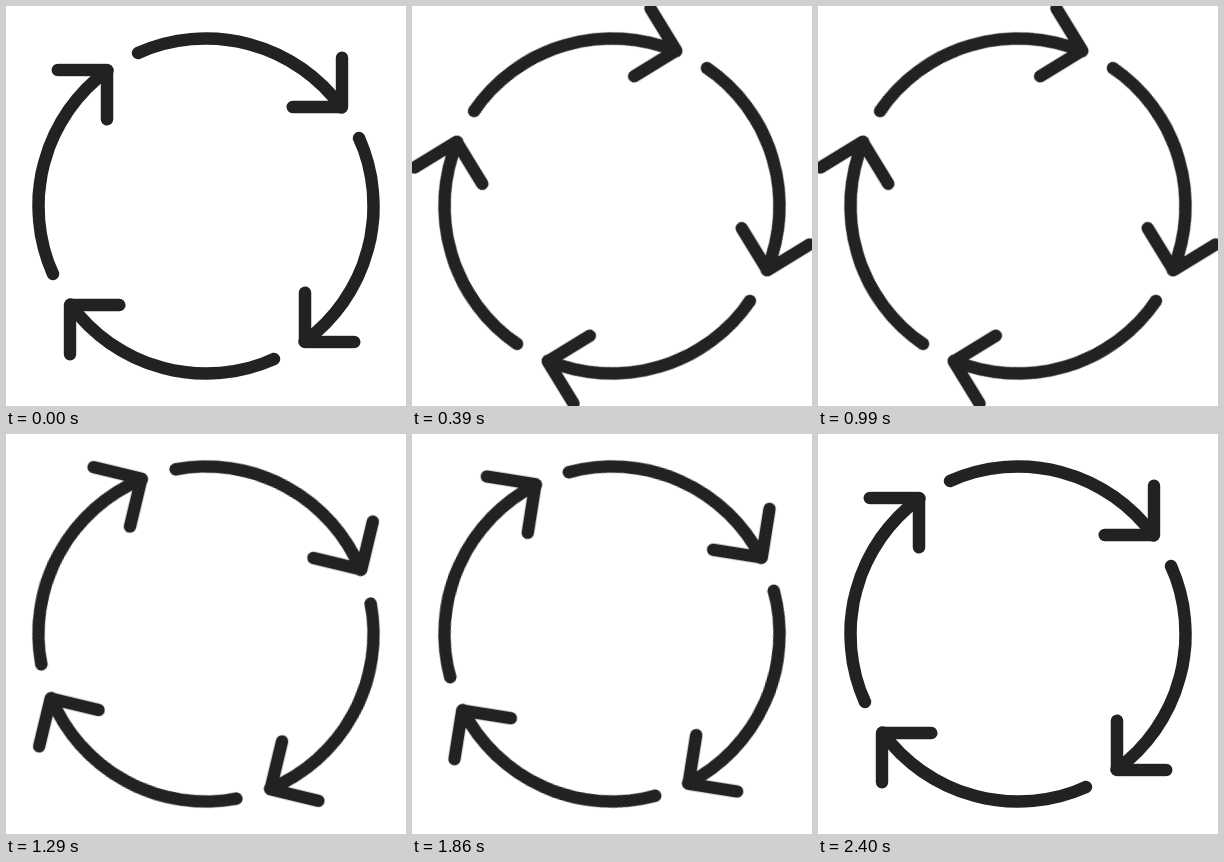
An HTML page that plays this animation: 400 by 400 pixels, repeating every 2.43 s.

```html
<!DOCTYPE html>
<html lang="en">
<head>
<meta charset="utf-8">
<title>Rotating arrows</title>
<style>
  html, body { margin: 0; width: 100%; height: 100%; overflow: hidden; background: #fff; }
  svg { display: block; width: 100vw; height: 100vh; }
  #ring {
    fill: none;
    stroke: #222;
    stroke-width: 12.4;
    stroke-linecap: round;
    stroke-linejoin: round;
    transform-origin: 0 0;
  }
</style>
</head>
<body>
<svg viewBox="-200 -200 400 400">
  <defs>
    <g id="arrow">
      <path d="M-68 -153A167.4 167.4 0 0 1 135.5 -98.5"/>
      <path d="M136 -148.3V-99H86.7"/>
    </g>
  </defs>
  <g id="ring">
    <use href="#arrow"/>
    <use href="#arrow" transform="rotate(90)"/>
    <use href="#arrow" transform="rotate(180)"/>
    <use href="#arrow" transform="rotate(270)"/>
  </g>
</svg>
<script>
  const STEP_MS = 30;
  const STEP_DEG = 4.5;
  const STEPS = 81; // one full turn, plus one step resting at the start pose

  document.getElementById('ring').animate(
    [{ transform: 'rotate(0deg)' }, { transform: `rotate(${STEPS * STEP_DEG}deg)` }],
    { duration: STEPS * STEP_MS, easing: `steps(${STEPS}, end)`, iterations: Infinity }
  );
</script>
</body>
</html>
```
